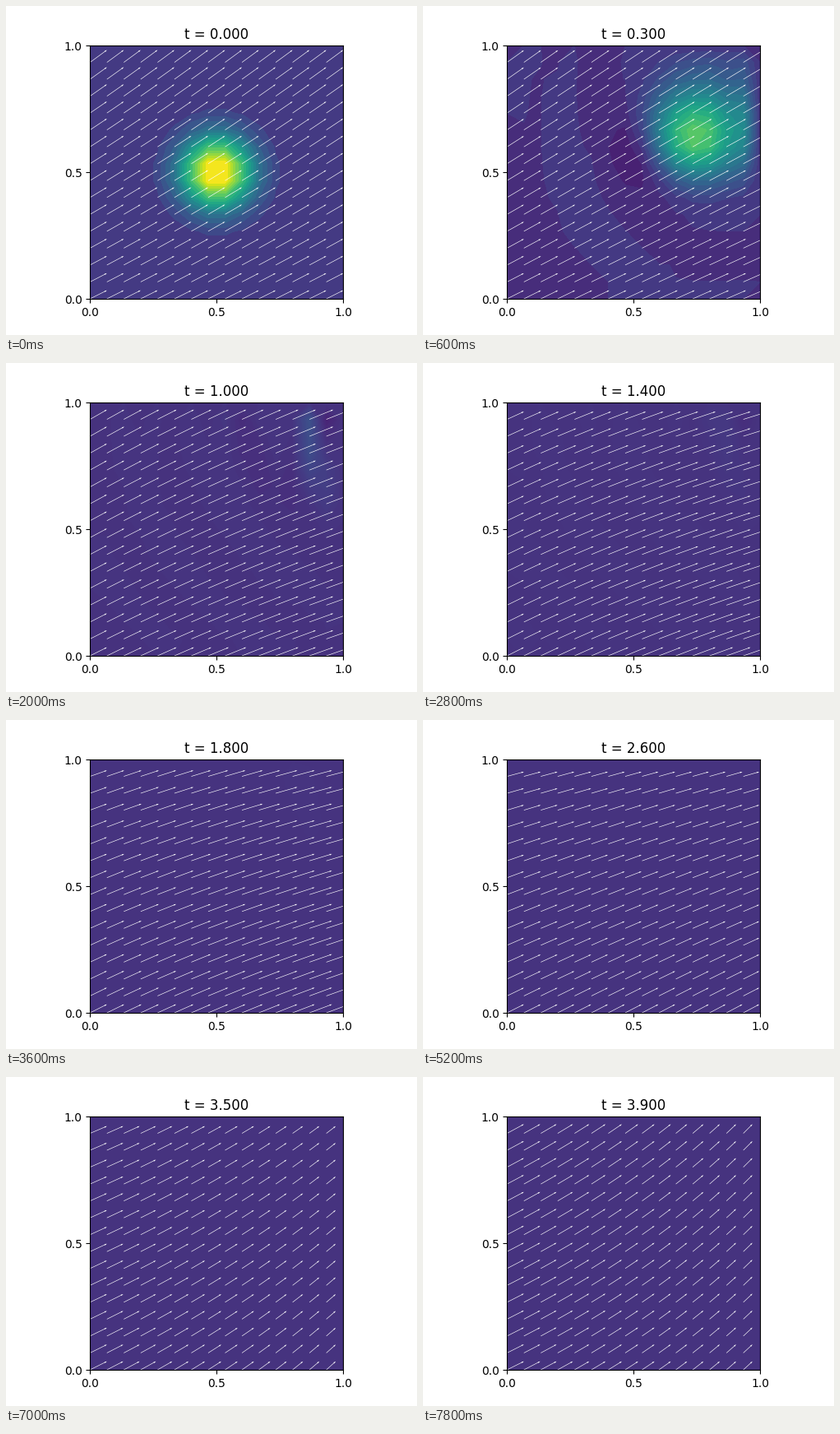
Write a matplotlib script that moves like this. It is 500 by 400 pixels and loops after 8000 ms.

```python
import numpy as np
import matplotlib.pyplot as plt
from matplotlib.animation import FuncAnimation

N = 16            # grid points per side
DT = 0.1          # time between frames
FRAMES = 40
DIFFUSION = 0.01
PERIOD = 5.0
VMIN, VMAX = -0.155, 0.895

axis = np.linspace(0, 1, N)
X, Y = np.meshgrid(axis, axis)
h = axis[1]


def velocity(t):
    phase = 2 * np.pi * t / PERIOD
    return 1 + 0.5 * X * np.sin(phase), 0.5 + 0.25 * Y * np.cos(phase)


# Central differences on the full grid
eye = np.eye(N)
up, down = np.eye(N, k=1), np.eye(N, k=-1)
d1 = (up - down) / (2 * h)
d2 = (up - 2 * eye + down) / h**2
DX, DY = np.kron(eye, d1), np.kron(d1, eye)
LAPLACE = np.kron(eye, d2) + np.kron(d2, eye)
inner = ((X > 0) & (X < 1) & (Y > 0) & (Y < 1)).ravel()
INNER = np.ix_(inner, inner)


def operator(t):
    vx, vy = velocity(t)
    full = DIFFUSION * LAPLACE - vx.reshape(-1, 1) * DX - vy.reshape(-1, 1) * DY
    return full[INNER]


def simulate():
    """Crank-Nicolson advection-diffusion, zero on the boundary."""
    u = np.exp(-((X - 0.5)**2 + (Y - 0.5)**2) / (2 * 0.1**2))
    fields = [u]
    state = u.ravel()[inner]
    one = np.eye(inner.sum())
    for n in range(FRAMES - 1):
        now, nxt = operator(n * DT), operator((n + 1) * DT)
        state = np.linalg.solve(one - DT / 2 * nxt,
                                (one + DT / 2 * now) @ state)
        field = np.zeros(N * N)
        field[inner] = state
        fields.append(field.reshape(N, N))
    return fields


fields = simulate()
fig, ax = plt.subplots(figsize=(5, 4), dpi=100)


def draw(n):
    t = n * DT
    ax.clear()
    ax.contourf(X, Y, fields[n], 20, vmin=VMIN, vmax=VMAX, cmap="viridis")
    ax.quiver(X, Y, *velocity(t), color="white", scale=15, width=0.002)
    ax.set_aspect("equal")
    ax.set(xlim=(0, 1), ylim=(0, 1), xticks=[0, 0.5, 1], yticks=[0, 0.5, 1])
    ax.set_title(f"t = {t:.3f}")
    return []


anim = FuncAnimation(fig, draw, frames=FRAMES, interval=200, repeat=True)
plt.show()
```
